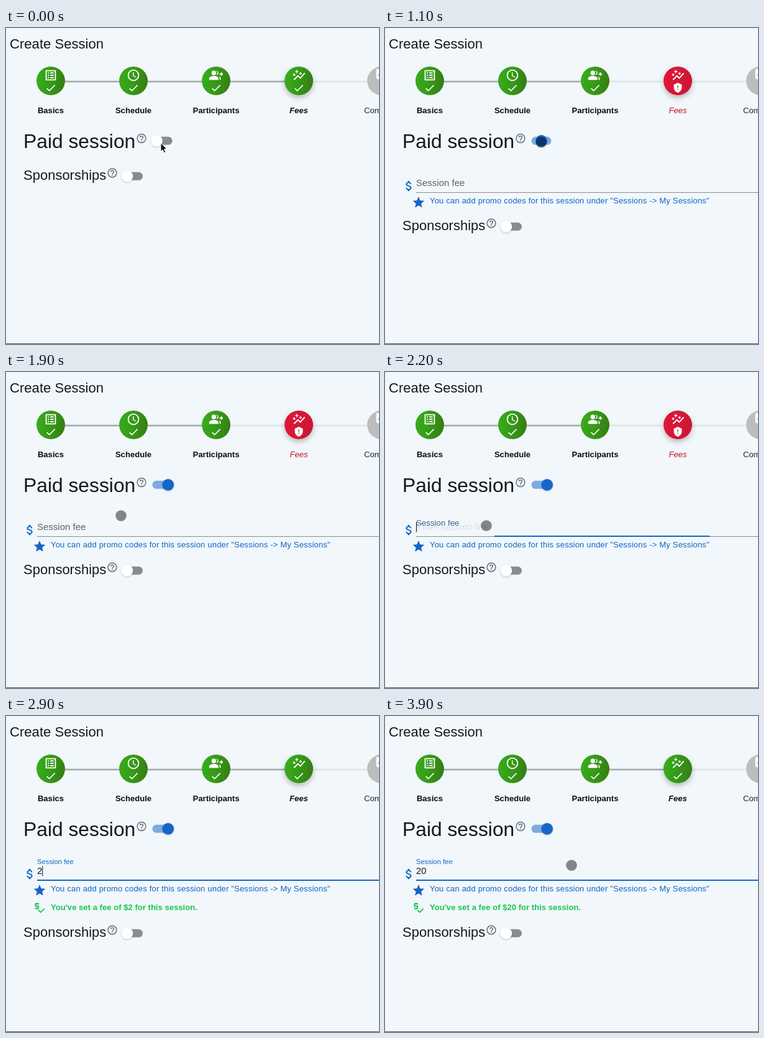
These frames come from a looping animation (600 by 508 pixels, 4 s). An HTML page:

```html
<!DOCTYPE html>
<html lang="en">
<head>
<meta charset="utf-8">
<title>Create Session</title>
<style>
  html, body { margin: 0; width: 100%; height: 100%; overflow: hidden; background: #f1f7fa; }
  svg { display: block; width: 600px; height: 508px; font-family: "Liberation Sans", Arial, sans-serif; fill: #14181f; }
  .step { font-size: 13.1px; font-weight: bold; text-anchor: middle; fill: #0c0e10; }
  .next { font-weight: normal; fill: #23272b; }
  .active { font-style: italic; }
  .error { font-weight: normal; fill: #c4162c; }
  .white { fill: #fff; }
  .blue { fill: #1565c8; }
  .ok { fill: #17c653; }
  .help { fill: #69717d; }
</style>
</head>
<body>
<svg id="stage" viewBox="0 0 600 508">
  <defs>
    <linearGradient id="green" x2="1" y2=".15">
      <stop offset="0" stop-color="#38ae1c"/><stop offset=".5" stop-color="#369c18"/><stop offset="1" stop-color="#368014"/>
    </linearGradient>
    <linearGradient id="red" x2="1" y2=".15">
      <stop offset="0" stop-color="#e01936"/><stop offset="1" stop-color="#cf1835"/>
    </linearGradient>
    <filter id="lift" x="-50%" y="-50%" width="200%" height="200%">
      <feDropShadow dx="0" dy="4" stdDeviation="4" flood-opacity=".25"/>
    </filter>
    <filter id="soft" x="-50%" y="-50%" width="200%" height="200%">
      <feDropShadow dx="0" dy="1" stdDeviation="1.2" flood-opacity=".28"/>
    </filter>
  </defs>
</svg>
<script>
const ICONS = {
  list: 'M19 5v14H5V5h14m1.1-2H3.9c-.5 0-.9.4-.9.9v16.2c0 .4.4.9.9.9h16.2c.4 0 .9-.5.9-.9V3.9c0-.5-.5-.9-.9-.9zM11 7h6v2h-6zm0 4h6v2h-6zm0 4h6v2h-6zM7 7h2v2H7zm0 4h2v2H7zm0 4h2v2H7z',
  clock: 'M12 2a10 10 0 1 0 0 20 10 10 0 0 0 0-20zm0 18a8 8 0 1 1 0-16 8 8 0 0 1 0 16zm.5-13H11v6l5.25 3.15.75-1.23-4.5-2.67z',
  people: 'M22 9V7h-2v2h-2v2h2v2h2v-2h2V9zM8 12a4 4 0 1 0 0-8 4 4 0 0 0 0 8zm0 1c-2.67 0-8 1.34-8 4v3h16v-3c0-2.66-5.33-4-8-4zm4.51-8.95a6 6 0 0 1 0 7.9 4 4 0 0 0 0-7.9zm4.02 9.78C17.42 14.66 18 15.7 18 17v3h2v-3c0-1.45-1.59-2.51-3.47-3.17z',
  graph: 'M14.06 9.94 12 9l2.06-.94L15 6l.94 2.06L18 9l-2.06.94L15 12zM4 14l.94-2.06L7 11l-2.06-.94L4 8l-.94 2.06L1 11l2.06.94zm4.5-5 1.09-2.41L12 5.5 9.59 4.41 8.5 2 7.41 4.41 5 5.5l2.41 1.09zm-4 11.5 6-6.01 4 4L23 8.93l-1.41-1.41-7.09 7.97-4-4L3 19z',
  badge: 'M19 1H5a2 2 0 0 0-2 2v12.93c0 .69.35 1.3.88 1.66L12 23l8.11-5.41c.53-.36.88-.97.88-1.66L21 3a2 2 0 0 0-2-2zm-9 15-5-5 1.41-1.41L10 13.17l7.59-7.59L19 7z',
  done: 'M9 16.17 4.83 12l-1.42 1.41L9 19 21 7l-1.41-1.41z',
  shield: 'M12 1 3 5v6c0 5.55 3.84 10.74 9 12 5.16-1.26 9-6.45 9-12V5zm1 15h-2v-2h2zm0-4h-2V7h2z',
  help: 'M11 18h2v-2h-2zm1-16a10 10 0 1 0 0 20 10 10 0 0 0 0-20zm0 18a8 8 0 1 1 0-16 8 8 0 0 1 0 16zm0-14a4 4 0 0 0-4 4h2c0-1.1.9-2 2-2s2 .9 2 2c0 2-3 1.75-3 5h2c0-2.25 3-2.5 3-5a4 4 0 0 0-4-4z',
  dollar: 'M11.8 10.9c-2.27-.59-3-1.2-3-2.15 0-1.09 1.01-1.85 2.7-1.85 1.78 0 2.44.85 2.5 2.1h2.21c-.07-1.72-1.12-3.3-3.21-3.81V3h-3v2.16c-1.94.42-3.5 1.68-3.5 3.61 0 2.31 1.91 3.46 4.7 4.13 2.5.6 3 1.48 3 2.41 0 .69-.49 1.79-2.7 1.79-2.06 0-2.87-.92-2.98-2.1h-2.2c.12 2.19 1.76 3.42 3.68 3.83V21h3v-2.15c1.95-.37 3.5-1.5 3.5-3.55 0-2.84-2.43-3.81-4.7-4.4z',
  star: 'M12 17.27 18.18 21l-1.64-7.03L22 9.24l-7.19-.61L12 2 9.19 8.63 2 9.24l5.46 4.73L5.82 21z',
  price: 'M11 13V9c0-.55-.45-1-1-1H6V6h5V4H8.5V3h-2v1H5c-.55 0-1 .45-1 1v4c0 .55.45 1 1 1h4v2H4v2h2.5v1h2v-1H10c.55 0 1-.45 1-1zm8.59-.48-5.66 5.65-2.83-2.83-1.41 1.42L13.93 21 21 13.93z'
};
const stage = document.getElementById('stage');
const $ = id => document.getElementById(id);

const icon = (name, x, y, cls, k = .93) =>
  `<path class="${cls}" d="${ICONS[name]}" transform="translate(${x} ${y}) scale(${k}) translate(-12 -12)"/>`;
const text = (str, x, y, size, attrs = '') =>
  `<text x="${x}" y="${y}" font-size="${size}" ${attrs}>${str}</text>`;
const toggle = (id, x, y) =>
  `<rect id="${id}Track" x="${x}" y="${y - 6.5}" width="32" height="13" rx="6.5" fill="#898b8e"/>
   <circle id="${id}Thumb" cx="${x + 7}" cy="${y}" r="9.3" fill="#fff" filter="url(#soft)"/>`;

const steps = [['Basics', 'list'], ['Schedule', 'clock'], ['Participants', 'people'], ['Fees', 'graph'], ['Complete', 'badge']];
const stepper = steps.map(([name, glyph], i) => {
  const x = 72 + 133 * i, fees = i === 3, last = i === 4;
  const line = last ? '' : `<rect id="line${i}" x="${x + 23}" y="84.8" width="87" height="2.6" fill="${fees ? '#e0e4e7' : '#a8a7ab'}"/>`;
  const mark = last ? '' : `<g id="mark${i}">${icon('done', x, 96.5, 'white', .8)}</g>`;
  return `${line}
    <circle id="disc${i}" cx="${x}" cy="85" r="23" fill="${last ? '#bdbdbd' : 'url(#green)'}" ${fees ? 'filter="url(#lift)"' : ''}/>
    ${icon(glyph, x, 76, 'white')}${mark}
    <text id="name${i}" class="step ${fees ? 'active' : last ? 'next' : ''}" x="${x}" y="136.5">${name}</text>`;
}).join('');

stage.insertAdjacentHTML('beforeend', `
  ${text('Create Session', 6, 32.5, 22.1)}
  ${stepper}
  <g id="warn">${icon('shield', 471, 96, 'white', .72)}</g>
  ${text('Paid session', 28, 193, 31.8)}
  ${icon('help', 218, 177.5, 'help', .77)}
  ${toggle('paid', 235.5, 181.3)}
  <g id="field">
    ${icon('dollar', 38.5, 254, 'blue')}
    <rect x="50" y="264" width="550" height="1" fill="#8b8e91"/>
    <rect id="bar" y="263" height="2" class="blue"/>
    ${text('Enter session fee', 50, 254, 15, 'id="hint"')}
    ${text('Session fee', 50, 254, 15, 'id="label"')}
    ${text('', 50, 254, 15, 'id="value"')}
    <rect id="caret" y="241" width="1" height="16.5" fill="#111"/>
    ${icon('star', 54, 280.3, 'blue')}
    ${text('You can add promo codes for this session under "Sessions -&gt; My Sessions"', 72, 282, 13, 'class="blue" letter-spacing=".19"')}
  </g>
  <g id="note">
    ${icon('price', 54, 308.5, 'ok')}
    ${text('', 72, 311.5, 13, 'id="noteText" class="ok" font-weight="bold" letter-spacing=".045"')}
  </g>
  <g id="sponsor">
    ${text('Sponsorships', 28, 243.5, 22)}
    ${icon('help', 171, 233, 'help', .77)}
    ${toggle('spon', 188, 238.3)}
  </g>
  <rect y="507" width="600" height="1" fill="#55585b"/>
  <circle id="dot" r="8.8" fill="#000" fill-opacity=".46"/>
  <path id="arrow" d="M249 185v13.5l3.1-2.9 2.2 5 2.4-1-2.2-4.9h4.3z" fill="#000" stroke="#fff" stroke-width="1"/>
`);

// [time, value...] rows, interpolated linearly
function track(rows, t) {
  const n = rows.findIndex(r => r[0] > t);
  if (n === 0) return rows[0].slice(1);
  if (n < 0) return rows[rows.length - 1].slice(1);
  const a = rows[n - 1], b = rows[n], p = (t - a[0]) / (b[0] - a[0]);
  return a.slice(1).map((v, i) => v + (b[i + 1] - v) * p);
}
const DOT = [[400, 250, 185], [700, 253, 184], [1600, 249, 183], [1700, 242, 188], [1900, 185, 231],
  [2000, 166, 245], [2100, 163, 247], [3500, 163, 247], [3600, 185, 246], [3800, 285, 241], [3900, 300, 240]];
const SWITCH = [[1000, 0], [1200, 1]];
const LABEL = [[2100, 0], [2200, .45], [2300, .88], [2400, 1]];
const BAR = [[2100, 0], [2200, .58], [2300, .9], [2400, 1]];
const HINT = [[2100, 0], [2200, .1], [2300, .3], [2400, .44]];
const mix = (a, b, p) => a + (b - a) * p;
const show = (id, on) => $(id).setAttribute('visibility', on ? 'visible' : 'hidden');
const set = (id, attrs) => { for (const k in attrs) $(id).setAttribute(k, attrs[k]); };

function draw(t) {
  const on = t >= 1100;
  const typed = t < 2800 ? '' : t < 3000 ? '2' : '20';
  const error = on && !typed;

  set('disc3', { fill: error ? 'url(#red)' : 'url(#green)' });
  set('name3', { class: error ? 'step active error' : 'step active' });
  set('line2', { fill: error ? '#e0e4e7' : '#a8a7ab' });
  show('mark3', !error);
  show('warn', error);

  const [s] = track(SWITCH, t);
  set('paidThumb', { cx: 242.5 + 18.3 * s, fill: s ? '#1565c8' : '#fff' });
  set('paidTrack', { fill: s ? '#7dabe0' : '#898b8e' });

  show('field', on);
  const [l] = track(LABEL, t), [b] = track(BAR, t), [h] = track(HINT, t);
  set('label', {
    y: mix(254, 238, l), 'font-size': mix(15, 11.25, l),
    fill: `rgb(${mix(97, 21, l)},${mix(99, 101, l)},${mix(101, 200, l)})`
  });
  set('bar', { x: 349 - 299 * b, width: 598 * b });
  set('hint', { 'fill-opacity': typed ? 0 : h });
  $('value').textContent = typed;

  const since = t < 2800 ? t - 2150 : t < 3000 ? t - 2800 : t - 3000;
  set('caret', { x: 50 + 8.3 * typed.length });
  show('caret', since >= 0 && since % 1000 < 500);

  show('note', typed);
  $('noteText').textContent = typed && `You've set a fee of $${typed} for this session.`;
  set('sponsor', { transform: `translate(0 ${typed ? 111 : on ? 81 : 0})` });

  const [x, y] = track(DOT, t);
  set('dot', { cx: x, cy: y });
  show('dot', (t >= 400 && t < 2800) || t >= 3600);
  show('arrow', t < 400);
}

const start = performance.now();
function tick() {
  const t = (performance.now() - start) % 4000;
  draw(Math.floor(t / 100) * 100);
  requestAnimationFrame(tick);
}
tick();
</script>
</body>
</html>
```
